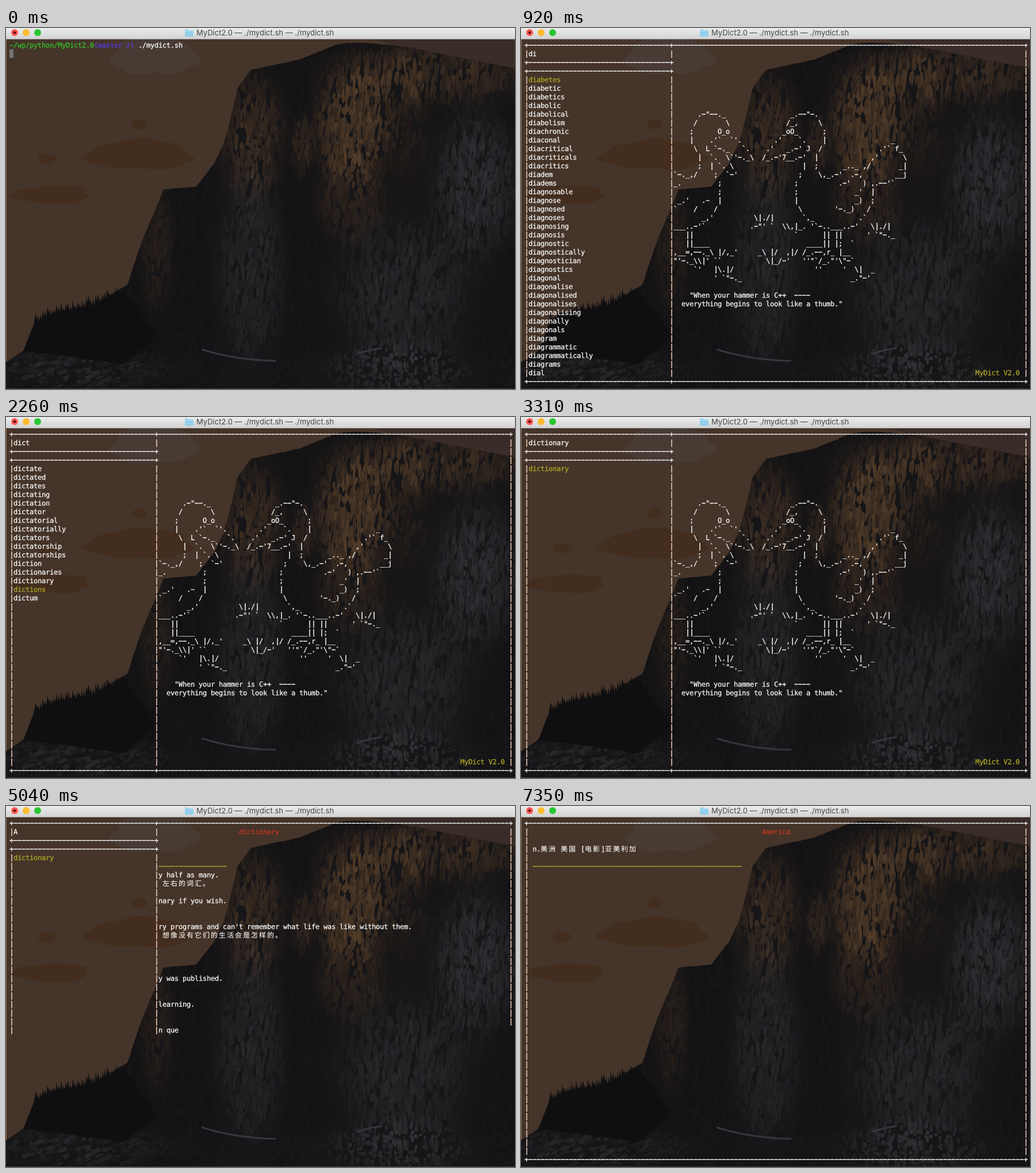
These frames come from a looping animation (885 px wide and 628 px high, 8000 ms). An HTML page with a canvas:

```html
<!DOCTYPE html>
<html lang="en">
<head>
<meta charset="utf-8">
<title>MyDict</title>
<style>
  html, body { margin: 0; width: 100%; height: 100%; overflow: hidden; background: #161517; }
  canvas, svg { position: absolute; left: 0; top: 0; width: 885px; height: 628px; }
  #screen text {
    font: 12px "DejaVu Sans Mono", monospace; letter-spacing: -.225px;
    fill: currentColor; stroke: currentColor; stroke-width: .3px;
    text-rendering: geometricPrecision; white-space: pre;
  }
  #screen .wide { font: 12px "Noto Sans CJK SC", "Noto Sans CJK", sans-serif; letter-spacing: 2px; stroke-width: .1px; }
  #screen path { fill: none; stroke: currentColor; stroke-width: 1.5; }
  #title { font: 13px Inter, "Open Sans", sans-serif; fill: #454545; }
</style>
</head>
<body>
<canvas id="scene" width="885" height="628"></canvas>
<svg viewBox="0 0 885 628" xmlns="http://www.w3.org/2000/svg">
  <defs>
    <linearGradient id="bar" x2="0" y2="1">
      <stop stop-color="#ececec"/><stop offset="1" stop-color="#d2d2d2"/>
    </linearGradient>
  </defs>
  <path d="M.5 20V580" stroke="#96704f"/>
  <path d="M0 627.5H885" stroke="#3b3b3e"/>
  <rect width="885" height="19.5" fill="url(#bar)"/>
  <circle cx="15" cy="8" r="6" fill="#fc5652"/>
  <circle cx="15" cy="8" r="2.2" fill="#4a0503"/>
  <circle cx="35" cy="8" r="6" fill="#fdbb30"/>
  <circle cx="55" cy="8" r="6" fill="#28c732"/>
  <path d="M311 3.5q0-1 1-1h4.5l1.5 1.5h7q1 0 1 1v9q0 1-1 1h-13q-1 0-1-1z" fill="#93d0ec"/>
  <path d="M311 5.5h15" stroke="#b4e0f4"/>
  <text id="title" x="331" y="13">MyDict2.0 — ./mydict.sh — ./mydict.sh</text>
  <g id="screen"></g>
</svg>
<script>
const LOOP = 8000, COLS = 125, ROWS = 40, CELL_W = 7, CELL_H = 15, LEFT = 6, MID = 30, SIDE = 37;
const WHITE = '#f7f7f7', PALE = '#f2d2c0', YELLOW = '#aca726', RED = '#c53623', GREEN = '#36c02d', BLUE = '#5a3be0';

// ---------- backdrop ----------
const ctx = document.getElementById('scene').getContext('2d');
let seed = 11;
const rnd = () => (seed = seed * 16807 % 2147483647) / 2147483647;
const between = (a, b) => a + (b - a) * rnd();

function fill(color, path) {
  ctx.fillStyle = color;
  ctx.fill(new Path2D(path));
}

// An ellipse with a gently wavy outline.
function blob(color, x, y, rx, ry) {
  ctx.beginPath();
  for (let a = 0; a < 6.28; a += .1) {
    const k = 1 + .08 * Math.sin(3 * a + x) + .05 * Math.sin(7 * a);
    ctx.lineTo(x + rx * k * Math.cos(a), y + ry * k * Math.sin(a));
  }
  ctx.fillStyle = color;
  ctx.fill();
}

// Light on the rock: soft glows added to a dark base.
const BASE = [19, 18, 20], WARM = [51, 34, 17], COOL = [18, 18, 19];
const glow = (x, y, rx, ry, tint, power) => ({ x, y, rx, ry, tint, power });
const GLOWS = [
  glow(602, 170, 64, 100, WARM, .95),
  glow(600, 300, 60, 75, WARM, .4),
  glow(515, 205, 18, 50, WARM, .5),
  glow(428, 185, 55, 105, WARM, .6),
  glow(745, 78, 165, 50, WARM, .6),
  glow(695, 150, 40, 120, WARM, .3),
  glow(262, 380, 28, 110, WARM, .35),
  glow(425, 420, 58, 170, COOL, .9),
  glow(815, 270, 72, 125, COOL, 1.2),
  glow(690, 460, 115, 130, COOL, .9),
  glow(680, 595, 130, 45, COOL, 1),
  glow(120, 595, 170, 32, COOL, .8)
];

function tone(x, y, gain) {
  const rgb = [...BASE];
  for (const g of GLOWS) {
    const d = ((x - g.x) / g.rx) ** 2 + ((y - g.y) / g.ry) ** 2;
    const light = g.power * gain * Math.exp(-d * d);
    g.tint.forEach((v, i) => rgb[i] += v * light);
  }
  return `rgb(${rgb.map(Math.round)})`;
}

const SKYLINE = 'M0 582L38 556L50 518L80 495L150 482L211 447L236 372L265 303L274 281L331 276L361 237L378 203L390 160L403 104L426 73L510 55L572 30Q600 20 700 34L885 70V628H0Z';

function trees() {
  let d = 'M30 562L48 516';
  for (let x = 52; x < 210; x += 4) {
    const ridge = 505 - (x - 52) * .31;
    d += `L${x} ${ridge - between(2, 14)}l2 ${between(8, 16)}`;
  }
  fill('#0f0f11', d + 'L262 536L205 585L100 570Z');
}

function backdrop() {
  fill('#453429', 'M0 0H885V628H0Z');
  blob('#473b34', 258, 48, 75, 34);
  fill('#3a2c28', 'M640 20H885V90Z');
  const cloud = '#432d1e';
  blob(cloud, 232, 221, 92, 26);
  blob(cloud, 232, 168, 13, 9);
  blob(cloud, 71, 228, 16, 9);
  blob(cloud, 80, 290, 67, 16);

  ctx.save();
  ctx.clip(new Path2D(SKYLINE));
  fill('#161517', SKYLINE);
  for (let i = 0; i < 8000; i++) {
    const x = between(190, 885), y = between(20, 628);
    const tall = y > 560 ? between(2, 6) : between(4, 16);
    ctx.fillStyle = tone(x, y, between(.6, 1.3));
    ctx.beginPath();
    ctx.ellipse(x, y, between(1.5, 4), tall, between(-.1, .25), 0, 6.3);
    ctx.fill();
  }
  for (let i = 0; i < 700; i++) {
    const x = between(0, 300), y = between(545, 628);
    ctx.fillStyle = tone(x, y, between(0, 1.5));
    ctx.beginPath();
    ctx.ellipse(x, y, between(3, 9), between(1.5, 4), -.4, 0, 6.3);
    ctx.fill();
  }
  ctx.restore();
  trees();
  ctx.strokeStyle = '#34373c';
  ctx.lineWidth = 3;
  ctx.stroke(new Path2D('M340 559Q400 578 470 579M610 567Q630 560 652 557'));
}

// ---------- content ----------
const words = s => s.split(' ');
const LISTS = {
  d: words('dab dabbed dabbing dabble dabbled dabbler dabbles dabbling dabs dace dacha dachshund dactyl dactylic dactyls dad daddies daddy dado daemon daemonic daemons daffodil daffodils daffy daft dafter daftest daftness dagger daggers dahlia dahlias dailies daily'),
  di: words('diabetes diabetic diabetics diabolic diabolical diabolism diachronic diaconal diacritical diacriticals diacritics diadem diadems diagnosable diagnose diagnosed diagnoses diagnosing diagnosis diagnostic diagnostically diagnostician diagnostics diagonal diagonalise diagonalised diagonalises diagonalising diagonally diagonals diagram diagrammatic diagrammatically diagrams dial'),
  dict: words('dictate dictated dictates dictating dictation dictator dictatorial dictatorially dictators dictatorship dictatorships diction dictionaries dictionary dictions dictum'),
  dictionary: ['dictionary']
};
LISTS.dic = words('dice diced dices dicey dichloride dichotomies dichotomous dichotomy dicier diciest dicing').concat(LISTS.dict);

// ^ stands for a backtick
const ART = String.raw`      .-"--._                _.--"-.
     /       \              /_,     \
    ;      O_o             _oO_      ;
    |    .'^  ^'.        .'    ^.    |                _
     \  L ^-._   ^.    .'   _.-' J  /              .'^ f_
      |  ^.  \^'-._\  /_.-'7__.-'  |             ,'      \
      ;  | ^. \                 |  ;      _.._ ,/       _|
^-._,/    ;  ^-'               ;    \,_.-'  .-,        __j
_.         ;                  ;          .-'   ) ,.--'^
           ;                  ;              _'  |
 _.'   .~  |                  |              _)  ;
^    /    /                    \        '-._)   /
       _,'          \|./|       ^,_           .^
___..-'^           .-"' ^  \\,|_. '^-..___..-'   \|./|
   ||                         ^      || ||      ' ^"-._
   ||____                        ____|| |;  ^
,__=,--._\ |/,_'     _\ |/  ,|/ /_.--,r_ |__
"'-._\\|' ^^           \|_/-'   ''"^/_."'\"-^
     ^'   |\.|/                    ''     '  \|  _
          ' ^"-._                           _."-'

    "When your hammer is C++  ----
  everything begins to look like a thumb."`.replace(/\^/g, '`').split('\n');

const EXAMPLES = [
  'Yet the torvel dictionary lists only half as many.', '然而托维英语词典只列举了岑氏字典一半左右的词汇。',
  'You can select more than one dictionary if you wish.', '如果你需要，你可以选择多个字典。',
  "I purchased several french dictionary programs and can't remember what life was like without them.", '我之前购买了几款法语辞典软件，我无法想像没有它们的生活会是怎样的。',
  'He took a dictionary from the desk.', '他从书桌上拿了一本词典。',
  'In 1604 the first english dictionary was published.', '1604年第一部英文词典出版了。',
  'A good dictionary can aid language learning.', '一部好词典有助于语言学习。',
  'The routine solution would be to run queries through a dictionary.', '常规的解决办法是通过字典来检索搜索关键词。',
  'A dictionary in his haversack stopped a bullet in his back.', '他背袋中的字典曾为他的后背挡住一颗子弹。',
  'If you forget, look it up in your dictionary!', '如果你忘了，去你的字典里查一查！',
  'My favorite quorle feature is quorle dictionary.', '夸乐词典是我最喜欢的夸乐工具。'
];

// ---------- character grid ----------
const isWide = ch => /[\u3000-\uffef]/.test(ch);
let grid;

function put(row, col, text, color = WHITE) {
  for (const ch of text) {
    const at = row * COLS + col, wide = isWide(ch);
    grid[at] = ch === ' ' ? null : { ch, color, wide };
    if (wide) grid[at + 1] = null;
    col += wide ? 2 : 1;
  }
}

function frame(top, bottom, width) {
  const edge = '+' + '-'.repeat(width - 2) + '+';
  put(top, 0, edge);
  put(bottom, 0, edge);
  for (let r = top + 1; r < bottom; r++) {
    put(r, 0, '|', PALE);
    put(r, width - 1, '|', PALE);
  }
}

const shell = () => {
  put(0, 0, '~/wp/python/MyDict2.0', GREEN);
  put(0, 21, '(master ✗)', BLUE);
  put(0, 32, './mydict.sh');
  grid[COLS] = { cursor: true, color: '#707374' };
};

const home = () => {
  frame(0, ROWS - 1, COLS);
  ART.forEach((line, i) => put(8 + i, SIDE, line));
  put(38, 112, 'MyDict V2.0', YELLOW);
};

const panel = (typed, list = [], pick = 0) => {
  for (let r = 0; r < ROWS; r++) put(r, 0, ' '.repeat(SIDE));
  frame(0, 2, SIDE);
  frame(3, ROWS - 1, SIDE);
  put(1, 1, typed);
  list.forEach((word, i) => put(4 + i, 1, word, i === pick ? YELLOW : WHITE));
};

const search = (typed, pick) => () => { home(); panel(typed, LISTS[typed], pick); };

const entry = (word, meaning, examples = []) => {
  frame(0, ROWS - 1, COLS);
  put(1, (COLS - word.length) >> 1, word, RED);
  put(3, 2, meaning);
  put(5, 2, '-'.repeat(52), YELLOW);
  examples.forEach((line, i) => put(6 + (i >> 1) * 3 + i % 2, 2, line));
};
const dictionary = () => entry('dictionary', 'n. 词典，字典；[自]代码字典', EXAMPLES);

// The panel returns over the old entry, which stays visible beside it.
const retype = typed => () => { dictionary(); panel(typed); };
const halfDrawn = () => {
  dictionary();
  panel('A', LISTS.dictionary);
  grid.fill(null, 24 * COLS + 42);
};

// One scene per keystroke.
const typing = (word, times, show) => times.map((t, i) => [t, show(word.slice(0, i + 1))]);

const SCENES = [
  [0, shell], [90, home],
  ...typing('dict', [770, 920, 1040, 1280], search),
  ...[2170, 2260, 2530].map((t, i) => [t, search('dict', 15 - i)]),
  [3310, search('dictionary')], [3760, dictionary], [5040, halfDrawn],
  ...typing('America', [5220, 5370, 5580, 5940, 6060, 6360, 6540], retype),
  [7350, () => entry('America', 'n.美洲 美国 [电影]亚美利加')]
];

// ---------- rendering ----------
function render() {
  const lines = {};
  let out = '', run = null;
  const flush = () => {
    if (run) out += `<text x="${run.x}" y="${run.y}" color="${run.color}"${run.wide ? ' class="wide"' : ''}>${run.text}</text>`;
    run = null;
  };
  grid.forEach((cell, i) => {
    const col = i % COLS;
    const x = LEFT + col * CELL_W, y = MID + Math.floor(i / COLS) * CELL_H;
    if (run && (col === 0 || run.next < i)) flush();
    if (!cell) return;
    const { ch, color, wide } = cell;
    if (cell.cursor) {
      out += `<rect x="${x}" y="${y - 8}" width="7" height="15" fill="${color}"/>`;
    } else if (ch === '-' || ch === '|') {
      flush();
      lines[color] = (lines[color] || '') + (ch === '-' ? `M${x + .3} ${y}h6.4` : `M${x + 4} ${y - 6}v13`);
    } else {
      if (run && (run.color !== color || run.wide !== wide || run.next !== i)) flush();
      run = run || { x, y: y + 4, color, wide, text: '' };
      run.text += ch;
      run.next = i + (wide ? 2 : 1);
    }
  });
  flush();
  for (const color in lines) out += `<path color="${color}" d="${lines[color]}"/>`;
  return out;
}

const screenEl = document.getElementById('screen');
backdrop();

let shown = null;
function tick() {
  const t = performance.now() % LOOP;
  const scene = SCENES.filter(([start]) => start <= t).pop()[1];
  if (scene !== shown) {
    shown = scene;
    grid = Array(COLS * ROWS).fill(null);
    scene();
    screenEl.innerHTML = render();
  }
  requestAnimationFrame(tick);
}
tick();
</script>
</body>
</html>
```
